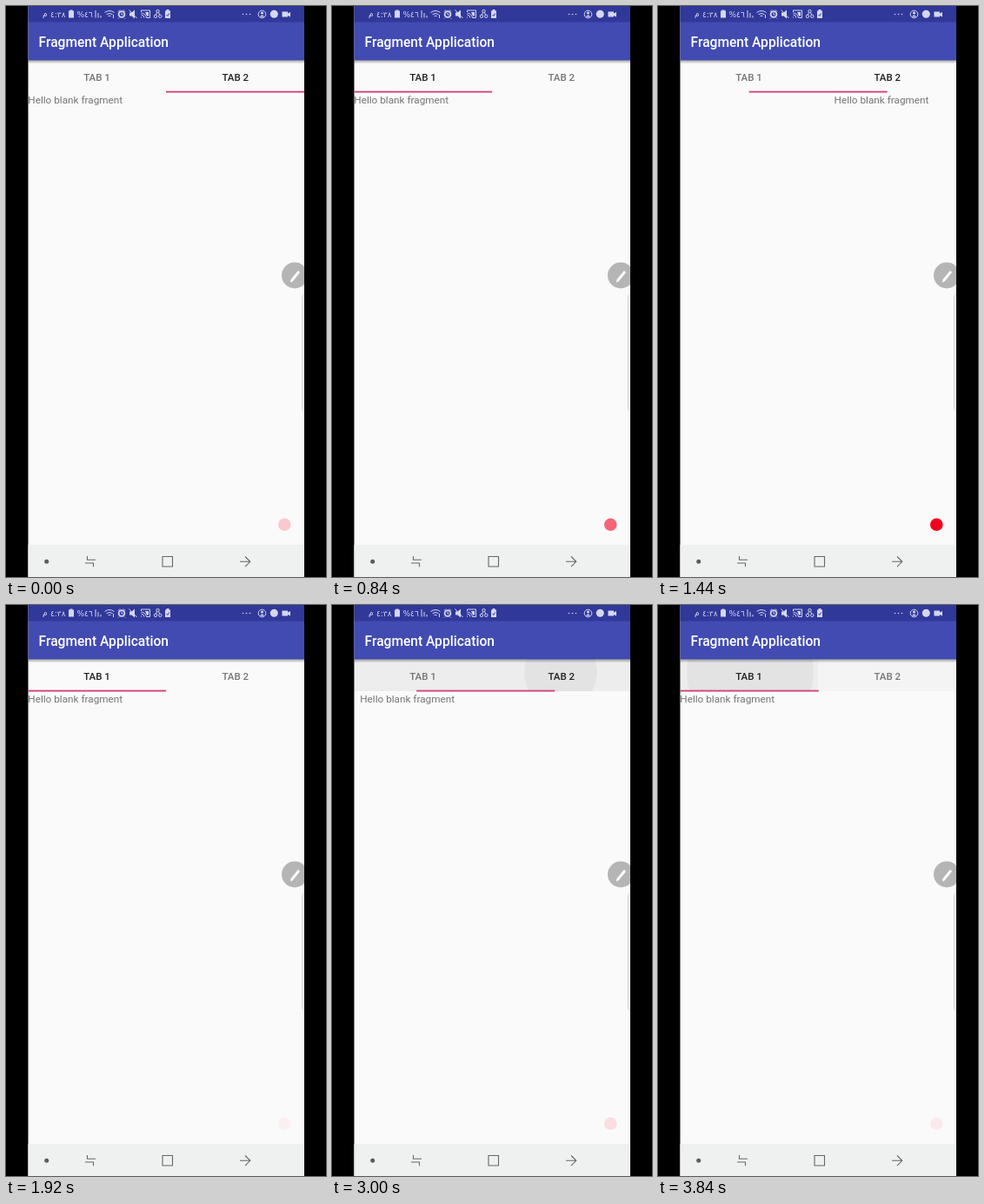
These frames come from a looping animation (368x656 px, 3.96 s). An HTML page:

```html
<!DOCTYPE html>
<html lang="en">
<head>
<meta charset="utf-8">
<style>
  html, body { margin: 0; width: 100%; height: 100%; overflow: hidden; background: #000; }
  svg { display: block; }
  text { font-family: Roboto, sans-serif; }
  .tab { font-size: 11.5px; font-weight: 500; text-anchor: middle; }
  .page { font-size: 11.75px; fill: #757575; }
  .status text { font: 9px "DejaVu Sans", sans-serif; fill: #d5d7ef; }
  .line { fill: none; stroke: #d5d7ef; }
  .nav { fill: none; stroke: #666; stroke-width: 1.1; }
</style>
</head>
<body>
<svg width="368" height="656" viewBox="0 0 368 656">
  <defs>
    <clipPath id="screen"><rect x="25.5" width="317.5" height="656"/></clipPath>
    <clipPath id="left"><rect x="25.5" y="62" width="158.5" height="37"/></clipPath>
    <clipPath id="right"><rect x="184" y="62" width="159" height="37"/></clipPath>
    <linearGradient id="shade" x2="0" y2="1">
      <stop stop-color="#000" stop-opacity=".32"/><stop offset="1" stop-color="#000" stop-opacity="0"/>
    </linearGradient>
  </defs>
  <rect width="368" height="656"/>
  <g clip-path="url(#screen)">
    <rect x="25" width="319" height="656" fill="#fafafa"/>
    <g id="ripples"></g>
    <text class="tab" id="tab1" x="104.5" y="85.7">TAB 1</text>
    <text class="tab" id="tab2" x="263.8" y="85.7">TAB 2</text>
    <text class="page" id="page1" y="112">Hello blank fragment</text>
    <text class="page" id="page2" y="112">Hello blank fragment</text>
    <rect id="indicator" y="97.7" width="159" height="1.8" fill="#d43c78"/>

    <rect x="25" width="319" height="19" fill="#30389a"/>
    <rect x="25" y="18.5" width="319" height="44" fill="#424bb1"/>
    <rect x="25" y="62.5" width="319" height="4" fill="url(#shade)"/>
    <text x="37.5" y="46.8" font-size="15.6" font-weight="500" fill="#fff">Fragment Application</text>

    <g class="status" fill="#d5d7ef">
      <text x="42" y="12">م</text>
      <text x="51" y="12.5" textLength="">٤:٣٨</text>
      <path d="M72 5.5h1.5v-1h3v1H78v8h-6z"/>
      <text x="81.5" y="12.5">%٤٦</text>
      <path class="line" d="M103 5v8.500M106 8v5.500M109 11v2.500"/>
      <path class="line" d="M113.500 7.500q5.500-4 11 0M115.500 9.700q3.500-2.500 7 0M117.500 11.700q1.500-1 3 0M123.500 10v4"/>
      <circle class="line" cx="133" cy="9.500" r="3.400" stroke-width="1.800"/>
      <path class="line" d="M129 6.500l2-2M137 6.500l-2-2M133 7.500v2.500h1.500M130 13.500l-1 1M136 13.500l1 1"/>
      <path d="M142 7.500h2.500l3.500-3v10l-3.500-3H142z"/>
      <path class="line" d="M141.500 4.500l9 9.500"/>
      <path class="line" d="M155.500 7v-2h10v8.500h-4M155.500 13.500v-1M155.500 10q3 .5 3.500 3.500M155.500 8q5 .5 6 5.500"/>
      <path d="M160 7h4v4.500h-2z"/>
      <g class="line"><circle cx="174.500" cy="6" r="1.700"/><circle cx="172" cy="11.800" r="1.700"/><circle cx="177.300" cy="11.800" r="1.700"/><path d="M173.500 7.500l-1 2.500M175.500 7.500l1 2.500"/></g>
      <path d="M183 5.500h1.500v-1.500h3v1.500h1.500v8.500h-6z"/>
      <path d="M184.500 10l1.300 1.400 2-3" fill="none" stroke="#30389a"/>
      <circle cx="272.500" cy="9.500" r=".8"/><circle cx="276.500" cy="9.500" r=".8"/><circle cx="280.500" cy="9.500" r=".8"/>
      <circle class="line" cx="294.500" cy="9.500" r="4.300"/>
      <circle cx="294.500" cy="8" r="1.600"/><path d="M291.800 12.500q2.700-4 5.400 0z"/>
      <circle cx="308.300" cy="9.300" r="4.500"/>
      <path d="M317.500 6.500h6.500v2l3-1.500v5.500l-3-1.500v1.500h-6.500z"/>
    </g>

    <circle cx="332" cy="309.500" r="15" fill="#b5b5b5"/>
    <path d="M328.500 315.500l8.500-10.500" stroke="#fff" stroke-width="2.800"/>
    <path d="M327 317.800l.5-3.300 2.200 1.700z" fill="#fff"/>
    <rect x="340.500" y="331.500" width="8" height="134" rx="3" fill="#fff" stroke="#d2d2d2"/>
    <circle id="dot" cx="320.300" cy="595.800" r="7.300" fill="#f3001f"/>

    <rect x="25" y="619" width="319" height="37" fill="#eff1f1"/>
    <circle cx="46.700" cy="638.300" r="2.500" fill="#5c5c5c"/>
    <path class="nav" d="M93.500 632v4.300h9.500M91 640h9.500v4.300M180 632.500h11.500v11.500H180zM269 638.300h11.500M275 632.500l5.800 5.800-5.800 5.800"/>
  </g>
</svg>
<script>
const LOOP = 3960, STEP = 120, LEFT = 25.3, WIDTH = 317.5;
const $ = id => document.getElementById(id);
const clamp = v => Math.min(1, Math.max(0, v));
const smooth = u => u * u * (3 - 2 * u);

// Each move: direction, then start and length for the indicator and for the pages.
const moves = [
  [-1, 480, 300, 480, 300],
  [1, 1260, 360, 1274, 360],
  [-1, 1680, 200, 1680, 200],
  [1, 2864, 290, 2865, 148],
  [-1, 3560, 290, 3560, 148],
];
const travel = (t, k) => moves.reduce((sum, m) => sum + m[0] * smooth(clamp((t - m[k]) / m[k + 1])), 1);

const taps = [
  { start: 2250, side: 'left', x: 106 },
  { start: 2850, side: 'right', x: 263 },
  { start: 3580, side: 'left', x: 106 },
];
for (const tap of taps) {
  $('ripples').insertAdjacentHTML('beforeend',
    `<g clip-path="url(#${tap.side})"><rect x="25" y="62" width="319" height="37"/><circle cx="${tap.x}" cy="77"/></g>`);
  [tap.back, tap.wave] = $('ripples').lastChild.children;
}

function drawRipple({ start, back, wave }, t) {
  const age = t - start;
  back.setAttribute('opacity', .052 * clamp(age / 100) * clamp((1200 - age) / 450));
  wave.setAttribute('r', Math.max(0, .28 * age));
  wave.setAttribute('opacity', .043 * clamp((400 - age) / 120));
}

function draw(t) {
  const bar = travel(t, 1), page = travel(t, 3);
  $('indicator').setAttribute('x', 25.2 + bar * 158.8);
  $('page1').setAttribute('x', LEFT - page * WIDTH);
  $('page2').setAttribute('x', LEFT + (1 - page) * WIDTH);
  $('tab1').setAttribute('fill', page > .4 ? '#757575' : '#212121');
  $('tab2').setAttribute('fill', page > .4 ? '#212121' : '#757575');
  taps.forEach(tap => drawRipple(tap, t));
  const phase = (t - (t < 1020 ? 620 : 1440)) / 980;
  $('dot').setAttribute('opacity', .04 + .48 * (1 + Math.cos(2 * Math.PI * phase)));
}

const origin = performance.now();
function tick() {
  const t = (performance.now() - origin) % LOOP;
  draw(Math.floor(t / STEP) * STEP);
  requestAnimationFrame(tick);
}
tick();
</script>
</body>
</html>
```
